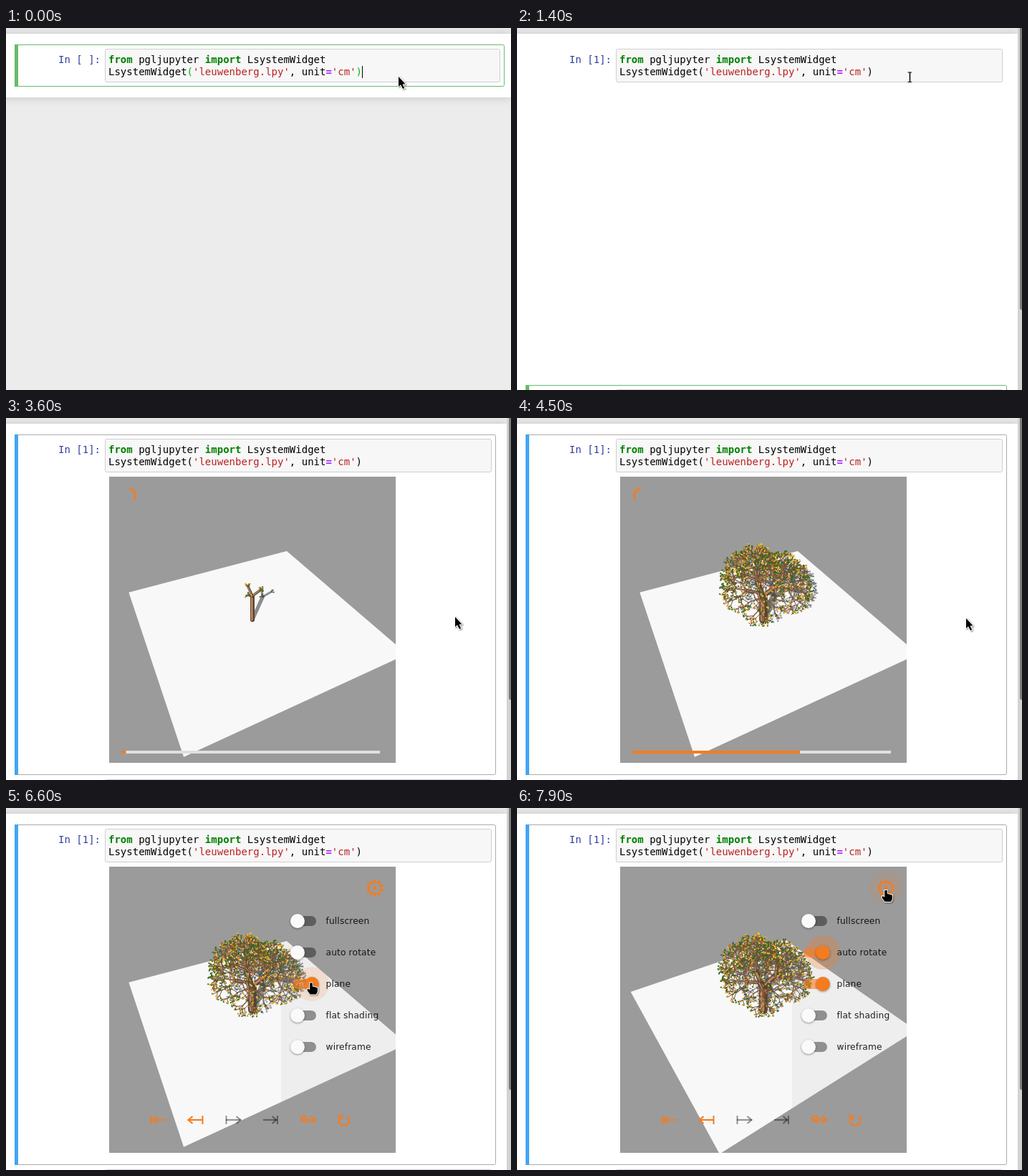
An HTML page with a canvas for the animation above (8000 ms loop, 705 px wide and 506 px high).

```html
<!DOCTYPE html>
<html lang="en">
<head>
<meta charset="utf-8">
<title>Growing tree in a notebook</title>
<style>
html, body { margin: 0; width: 100%; height: 100%; overflow: hidden; background: #ececec; }
canvas { display: block; }
</style>
</head>
<body>
<canvas id="stage" width="705" height="506"></canvas>
<script>
const ctx = document.getElementById('stage').getContext('2d');
const LOOP = 8000, STEP = 100;
const MONO = '14px "DejaVu Sans Mono", monospace';
const ORANGE = '#f47c20', OFF = 'rgba(0,0,0,.4)';
const clamp = (v, a = 0, b = 1) => Math.min(b, Math.max(a, v));
const within = (t, a, b) => t >= a && t < b;

// ---------- drawing helpers ----------
function rect(x, y, w, h, color) {
  ctx.fillStyle = color;
  ctx.fillRect(x, y, w, h);
}
function disc(x, y, r, color) {
  ctx.fillStyle = color;
  ctx.beginPath();
  ctx.arc(x, y, r, 0, 7);
  ctx.fill();
}
function trace(points, close) {
  ctx.beginPath();
  points.forEach(([x, y]) => ctx.lineTo(x, y));
  if (close) ctx.closePath();
}
function line(points, color, width) {
  trace(points);
  ctx.strokeStyle = color;
  ctx.lineWidth = width;
  ctx.stroke();
}
function arc(x, y, r, from, to, color, width) {
  ctx.beginPath();
  ctx.arc(x, y, r, from, to);
  ctx.strokeStyle = color;
  ctx.lineWidth = width;
  ctx.stroke();
}
function outline(x, y, w, h, radius, stroke, fill) {
  ctx.beginPath();
  ctx.roundRect(x + .5, y + .5, w - 1, h - 1, radius);
  if (fill) { ctx.fillStyle = fill; ctx.fill(); }
  ctx.strokeStyle = stroke;
  ctx.lineWidth = 1;
  ctx.stroke();
}
function runs(x, y, parts) {
  for (const [text, color = '#000', bold] of parts) {
    ctx.font = (bold ? 'bold ' : '') + MONO;
    ctx.fillStyle = color;
    ctx.fillText(text, x, y);
    x += ctx.measureText(text).width;
  }
}

// ---------- notebook ----------
function frameCell(y, h, right, border, bar) {
  outline(12, y, right - 12, h, 2, border);
  rect(12, y, 5, h, bar);
}
function prompt(mark, y) {
  runs(73, y, [[`In [${mark}]:`, '#303f9f']]);
}
function inputBox(y, h, right) {
  outline(138, y, right - 138, h, 2, '#cfcfcf', '#f7f7f7');
}
function notebook(t) {
  const done = t >= 1400, ran = t >= 800, selected = t >= 2800;
  const width = done ? 699 : 705, right = done ? 684 : 696;
  const GREEN = '#66bb6a', paren = ran ? '#000' : '#0b0';
  rect(0, 0, 705, 506, '#ececec');
  ctx.save();
  ctx.shadowColor = 'rgba(87,87,87,.28)';
  ctx.shadowBlur = 12;
  rect(-20, 8, width + 20, done ? 540 : ran ? 132 : 89, '#fff');
  ctx.restore();

  if (!ran) frameCell(23, 59, right, GREEN, GREEN);
  if (selected) frameCell(23, 476, right, '#ababab', '#42a5f5');
  inputBox(29, 47, right - 6);
  prompt(done ? '1' : ran ? '*' : ' ', 49);
  runs(143, 49, [['from', '#008000', 1], [' pgljupyter '], ['import', '#008000', 1], [' LsystemWidget']]);
  runs(143, 66, [['LsystemWidget'], ['(', paren], ["'leuwenberg.lpy'", '#ba2121'], [', unit'],
    ['=', '#a2f', 1], ["'cm'", '#ba2121'], [')', paren]]);
  if (t < 300) rect(497, 53, 1, 17, '#000');

  if (done) {
    if (!selected) frameCell(499, 43, right, GREEN, GREEN);
    inputBox(505, 31, right - 6);
    rect(699, 0, 6, 506, '#d2d2d2');
    ctx.fillStyle = '#7b7b7b';
    ctx.beginPath();
    ctx.roundRect(702, -4, 8, 398, 3);
    ctx.fill();
  } else if (ran) {
    frameCell(82, 43, right, GREEN, GREEN);
    inputBox(88, 31, right - 6);
    prompt(' ', 108);
    if (t < 1300) rect(143, 95, 1, 17, '#000');
  }
}

// ---------- 3D scene ----------
const FOCAL = 200 / Math.tan(25 * Math.PI / 180), SIN = 2 / 3, COS = Math.sqrt(5) / 3;
const SUN = [.38, 1.27];
let spin = 0;
function project([x, y, z]) {
  const c = Math.cos(spin), s = Math.sin(spin);
  const u = x * c - y * s, v = x * s + y * c;
  const depth = 3 + v * COS - z * SIN;
  return [344 + FOCAL * u / depth, 282 - FOCAL * (v * SIN + z * COS) / depth, depth];
}
const shade = ([x, y, z]) => project([x + SUN[0] * z, y + SUN[1] * z, 0]);

function seeded(seed) {
  return () => (seed = (seed * 16807) % 2147483647) / 2147483647;
}
const mix = (a, p, b, q) => a.map((v, i) => v * p + b[i] * q);
const cross = (a, b) => [a[1] * b[2] - a[2] * b[1], a[2] * b[0] - a[0] * b[2], a[0] * b[1] - a[1] * b[0]];
const DEPTH = 6;

// Every apex turns into a segment that carries three new apices.
function buildTree(growth) {
  const rnd = seeded(4711), segments = [], tips = [];
  const share = k => clamp((growth - k + .6) / 2.6);
  (function sprout(base, head, side, k) {
    const length = (k ? .155 * .76 ** (k - 1) : .29) * share(k);
    const end = mix(base, 1, head, length);
    segments.push({ a: base, b: end, k });
    if (k === DEPTH || share(k + 1) <= 0) {
      tips.push(end);
      return;
    }
    const other = cross(head, side), start = rnd() * 2;
    for (let i = 0; i < 3; i++) {
      const roll = start + i * Math.PI * 2 / 3, tilt = .72 + rnd() * .16;
      const out = mix(side, Math.cos(roll), other, Math.sin(roll));
      sprout(end, mix(head, Math.cos(tilt), out, Math.sin(tilt)),
        mix(out, Math.cos(tilt), head, -Math.sin(tilt)), k + 1);
    }
  })([0, 0, 0], [0, 0, 1], [1, 0, 0], 0);
  return { segments, tips };
}

function drawTree(growth) {
  if (growth <= -.5) {
    rect(342, 280, 4, 3, '#6b4a33');
    rect(344, 280, 2, 1, '#c79a6a');
    return;
  }
  const { segments, tips } = buildTree(growth);
  const girth = 6 + 6 * clamp((growth - 2) / 6);
  const thick = k => Math.max(.8, girth * .58 ** k);
  ctx.lineCap = 'round';
  for (let k = 0; k <= DEPTH; k++) {
    ctx.beginPath();
    for (const s of segments) if (s.k === k) {
      ctx.moveTo(...shade(s.a).slice(0, 2));
      ctx.lineTo(...shade(s.b).slice(0, 2));
    }
    ctx.strokeStyle = 'rgba(70,70,70,.6)';
    ctx.lineWidth = thick(k) * .85;
    ctx.stroke();
  }
  for (const p of tips) {
    const [x, y] = shade(p);
    rect(x - 1, y - 1, 2.4, 2, 'rgba(85,85,85,.5)');
  }

  const rnd = seeded(99), items = [];
  for (const s of segments) {
    const a = project(s.a), b = project(s.b), w = thick(s.k);
    items.push([(a[2] + b[2]) / 2, () => {
      line([a, b], '#5f412f', w);
      line([[a[0] - w * .12, a[1]], [b[0] - w * .12, b[1]]], s.k > 4 ? '#8d6a50' : '#b58a66', w * .45);
    }]);
  }
  for (const p of tips) {
    const [x, y, depth] = project(p);
    for (let i = 0; i < 2; i++) {
      const pick = rnd(), dx = rnd() * 4 - 3, dy = rnd() * 4 - 3;
      const color = pick < .52 ? '#2c6b22' : pick < .78 ? '#f0c232' : '#dc7d22';
      items.push([depth - .01, () => rect(x + dx, y + dy, 2, 1.9, color)]);
    }
  }
  items.sort((a, b) => b[0] - a[0]).forEach(item => item[1]());
  ctx.lineCap = 'butt';
}

function scene(growth) {
  rect(144, 82, 400, 400, '#9b9b9b');
  const corners = [0, 1, 2, 3].map(i => {
    const a = Math.atan(.5) + Math.PI / 4 + i * Math.PI / 2;
    return project([Math.SQRT2 * Math.cos(a), Math.SQRT2 * Math.sin(a), 0]);
  });
  trace(corners, true);
  ctx.fillStyle = '#f8f8f8';
  ctx.fill();
  drawTree(growth);
}

// ---------- widget controls ----------
function arrowIcon(cx, dir, barAtTip, color) {
  const y = 436, tip = cx + dir * (barAtTip ? 8.5 : 10.5), bar = cx + dir * (barAtTip ? 10 : -9.5);
  line([[cx - dir * 10, y], [tip, y]], color, 2.2);
  line([[tip - dir * 6, y - 5], [tip, y], [tip - dir * 6, y + 5]], color, 2.2);
  line([[bar, y - 6], [bar, y + 6]], color, 2);
}
function buttons(atEnd) {
  const back = atEnd ? ORANGE : OFF, next = atEnd ? OFF : ORANGE;
  arrowIcon(213, -1, true, back);
  arrowIcon(265, -1, false, back);
  arrowIcon(317, 1, false, next);
  arrowIcon(369, 1, true, next);
  line([[411, 436], [431, 436]], ORANGE, 2.2);
  line([[426, 431], [432, 436], [426, 441]], ORANGE, 2.2);
  arc(416, 434, 3.6, 1.2, 6.6, ORANGE, 2.2);
  line([[419, 435], [419, 441]], ORANGE, 2);
  arc(472, 436.5, 7.5, -.9, 3.9, ORANGE, 2.2);
  line([[463, 430.5], [469, 430.5], [469, 436]], ORANGE, 2.2);
}
function gear() {
  arc(515, 112, 8.6, 0, 7, ORANGE, 2);
  for (let i = 0; i < 10; i++) {
    const a = i * Math.PI / 5 + .3, c = Math.cos(a), s = Math.sin(a);
    line([[515 + c * 9, 112 + s * 9], [515 + c * 12, 112 + s * 12]], ORANGE, 3);
  }
  disc(515, 112, 2.4, ORANGE);
}
function topIcons() {
  for (const sx of [-1, 1]) for (const sy of [-1, 1]) {
    const x = 466 + sx * 12.8, y = 112 + sy * 12.8;
    line([[x - sx * 8, y], [x, y], [x, y - sy * 8]], ORANGE, 2.4);
  }
  arc(419, 105, 4.4, 0, 7, ORANGE, 2);
  arc(419, 105, 1.6, 0, 4.5, ORANGE, 1.4);
  line([[419, 110], [419, 124]], ORANGE, 2);
  for (const s of [-1, 1]) {
    trace([[419, 121], [419 + s * 7, 115], [419 + s * 6, 109], [419 + s * 2, 113]], true);
    ctx.fillStyle = ORANGE;
    ctx.fill();
  }
}
function slider(p, busy) {
  const x = 161 + 366 * p;
  rect(x, 465, Math.max(0, (busy ? 522 : 527) - x), 4, '#e0e0e0');
  rect(161, 465, x - 161, 4, ORANGE);
}
function ripple(x, y, alpha) {
  if (alpha > 0) disc(x, y, 24, `rgba(244,124,32,${alpha})`);
}
function toggle(label, y, on) {
  const x = 407 + 20 * on;
  ctx.fillStyle = on > .4 ? 'rgba(255,124,32,.6)' : 'rgba(0,0,0,.4)';
  ctx.beginPath();
  ctx.roundRect(400, y - 7, 33, 14, 7);
  ctx.fill();
  ctx.save();
  ctx.shadowColor = 'rgba(0,0,0,.4)';
  ctx.shadowBlur = 3;
  ctx.shadowOffsetY = 1;
  disc(x, y, 10, on > .4 ? ORANGE : '#fafafa');
  ctx.restore();
  ctx.font = '12.25px "DejaVu Sans", sans-serif';
  ctx.letterSpacing = '0.13px';
  ctx.fillStyle = 'rgba(0,0,0,.87)';
  ctx.fillText(label, 446.5, y + 4);
  ctx.letterSpacing = '0px';
}
function settings(t) {
  rect(384, 82, 160, 400, 'rgba(155,155,155,.11)');
  const rotate = clamp((t - 7270) / 155);
  if (within(t, 6200, 6500)) ripple(407, 290, .1);
  if (within(t, 6400, 6800)) ripple(427, 246, .15);
  if (t >= 6800) ripple(407 + 20 * rotate, 202, t < 7300 ? .12 : .28);
  toggle('fullscreen', 158, 0);
  toggle('auto rotate', 202, rotate);
  toggle('plane', 246, 1);
  toggle('flat shading', 290, 0);
  toggle('wireframe', 334, 0);
}

function widget(t) {
  const growth = t < 3000 ? -1 : Math.min(9, 2 + (t - 3600) / 160);
  const busy = within(t, 2900, 4800), menu = t >= 5600;
  spin = Math.max(0, t - 7317) * .012 * Math.PI / 180;
  ctx.save();
  ctx.beginPath();
  ctx.rect(144, 82, 400, 400);
  ctx.clip();
  scene(growth);
  if (busy) {
    const a = -Math.PI / 2 + (t - 3600) / 1400 * Math.PI * 2;
    arc(172, 108, 8.6, a, a + 2.35, ORANGE, 3);
    slider(clamp(growth / 9) ** 2.7, true);
  } else if (within(t, 2000, 2900)) {
    slider(0, false);
  }
  if (menu) settings(t);
  if (within(t, 2000, 2900) || t >= 4900) {
    buttons(t > 4800);
    if (!menu) topIcons();
    if (within(t, 5600, 5900)) ripple(515, 111, .28);
    if (t >= 7900) ripple(515, 111, .1);
    gear();
  }
  ctx.restore();
}

// ---------- pointer ----------
const PATH = [
  [1800, 548, 68], [2000, 530, 170], [2200, 485, 305], [2700, 371, 432], [2900, 372, 434],
  [3300, 520, 340], [3600, 627, 278], [4500, 627, 280], [4900, 540, 340], [5400, 436, 438],
  [5600, 510, 150], [5700, 519, 113], [5850, 517, 116], [6200, 422, 284], [6400, 424, 284],
  [6800, 428, 205], [7100, 428, 197], [7500, 428, 197], [7900, 515, 115]
];
function pointerAt(t) {
  const i = PATH.findIndex(p => p[0] >= t);
  if (i < 1) return PATH[i ? PATH.length - 1 : 0].slice(1);
  const [t0, x0, y0] = PATH[i - 1], [t1, x1, y1] = PATH[i], p = (t - t0) / (t1 - t0);
  return [x0 + (x1 - x0) * p, y0 + (y1 - y0) * p];
}
const ARROW = [[0, 0], [0, 14], [3, 11.2], [6, 17], [8.2, 16], [5.5, 10.5], [9.5, 10.3]];
const HAND = [[-1.8, 0], [1.8, 0], [2, 5], [5, 5.4], [9, 7], [9, 12], [7, 16], [-1.5, 16], [-5.5, 10.5], [-5, 8], [-1.8, 9.5]];
function pointer(t) {
  const [x, y] = pointerAt(t);
  if (within(t, 300, 1900)) {
    line([[545.5, 62], [551, 62]], '#000', 1);
    line([[548.5, 62], [548.5, 76]], '#000', 1.5);
    line([[545.5, 75.5], [551, 75.5]], '#000', 1);
    return;
  }
  const hand = within(t, 2600, 3000) || within(t, 5300, 5500) || within(t, 5700, 5900) ||
    within(t, 6200, 7600) || t >= 7900;
  trace((hand ? HAND : ARROW).map(([dx, dy]) => [x + dx, y + dy]), true);
  ctx.lineJoin = 'round';
  ctx.strokeStyle = '#fff';
  ctx.lineWidth = 2;
  ctx.save();
  ctx.shadowColor = 'rgba(0,0,0,.45)';
  ctx.shadowBlur = 2;
  ctx.shadowOffsetX = ctx.shadowOffsetY = 1;
  ctx.stroke();
  ctx.restore();
  ctx.lineJoin = 'miter';
  ctx.fillStyle = '#000';
  ctx.fill();
}

// ---------- loop ----------
let shown = -1;
function tick(now) {
  const t = Math.floor((now % LOOP) / STEP) * STEP;
  if (t !== shown) {
    shown = t;
    notebook(t);
    if (t >= 1500) widget(t);
    pointer(t);
  }
  requestAnimationFrame(tick);
}
tick(0);
</script>
</body>
</html>
```
